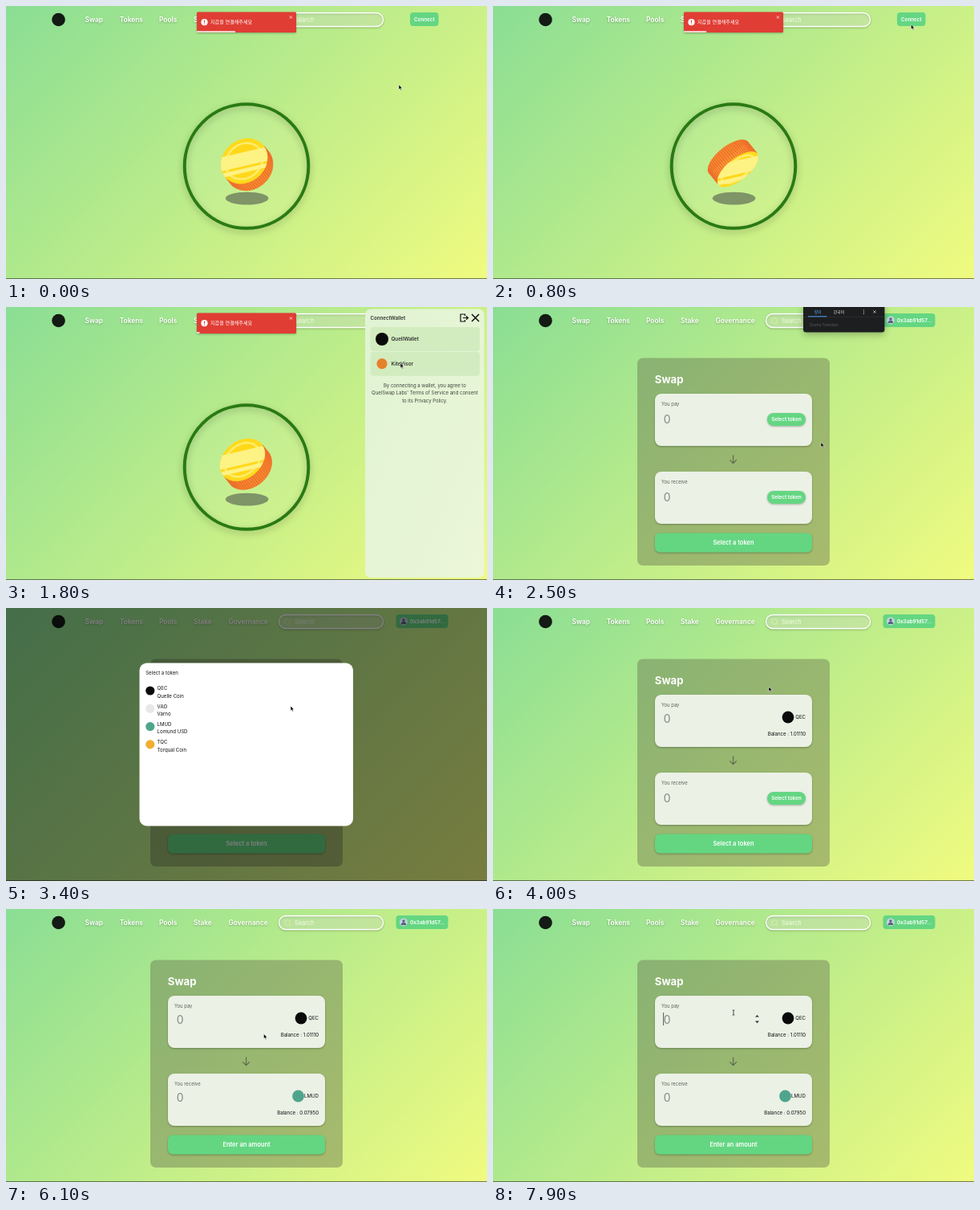
Animation of 600 by 340 pixels, one loop 8000 ms. Source, as an HTML page:

```html
<!DOCTYPE html>
<html lang="en">
<head>
<meta charset="utf-8">
<title>Token swap demo</title>
<style>
  html, body { margin: 0; width: 100%; height: 100%; overflow: hidden; }
  body { background: linear-gradient(135deg, #8ade94, #f0fb80); }
  svg { position: absolute; left: 0; top: 0; display: block; }
  text { font-family: Inter, "Noto Sans CJK KR", "Noto Sans CJK", sans-serif; white-space: pre; }
  .low { filter: drop-shadow(0 1px 1px rgba(0, 0, 0, .28)); }
  .deep { filter: drop-shadow(0 3px 4px rgba(0, 0, 0, .25)); }
</style>
</head>
<body>
<svg id="stage" width="600" height="340" viewBox="0 0 600 340"></svg>
<script>
const LOOP = 8000, STEP = 100;
const GREEN = '#64d682', INK = '#111';

// Markup helpers
const text = (x, y, size, str, { w = 400, fill = '#fff', at = 'start' } = {}) =>
  `<text x="${x}" y="${y}" font-size="${size}" font-weight="${w}" fill="${fill}" text-anchor="${at}">${str}</text>`;
const rect = (x, y, w, h, r, fill, more = '') =>
  `<rect x="${x}" y="${y}" width="${w}" height="${h}" rx="${r}" fill="${fill}" ${more}/>`;
const dot = (x, y, r, fill, more = '') =>
  `<circle cx="${x}" cy="${y}" r="${r}" fill="${fill}" ${more}/>`;
const line = (d, stroke, w, more = '') =>
  `<path d="${d}" fill="none" stroke="${stroke}" stroke-width="${w}" ${more}/>`;
const group = (id, body, more = '') => `<g id="${id}" ${more}>${body}</g>`;
const cross = (x, y, r, stroke, w) =>
  line(`M${x - r} ${y - r}l${2 * r} ${2 * r}m0 ${-2 * r}l${-2 * r} ${2 * r}`, stroke, w);

const tokens = [
  ['QEC', 'Quelle Coin', '#0a0a0a'],
  ['VAO', 'Varno', '#e8e8e8'],
  ['LMUD', 'Lomund USD', '#4fa58c'],
  ['TQC', 'Torqual Coin', '#f1ae2f'],
];

function nav() {
  const links = [[98.5, 'Swap'], [141.7, 'Tokens'], [191, 'Pools'], [234, 'Stake'], [277.5, 'Governance']];
  return dot(65.5, 17, 8.3, '#141a14') +
    `<g class="low">${links.map(([x, s]) => text(x, 20, 8.4, s, { w: 600 })).join('')}</g>` +
    rect(340.5, 8.5, 130, 17, 8.5, 'rgba(255,255,255,.22)', 'stroke="#fff" stroke-width="1.4" class="low"') +
    line('M353.6 19.6l2 2M354.3 17a3.3 3.3 0 1 1-6.6 0a3.3 3.3 0 1 1 6.6 0', 'rgba(235,240,170,.9)', .8) +
    text(360, 19.6, 7.4, 'Search', { fill: '#f4fbe6' }) +
    group('connect', rect(504, 8, 35.5, 17, 4, GREEN) + text(521.8, 19, 6.25, 'Connect', { w: 600, at: 'middle' })) +
    group('account', rect(486.5, 8, 65, 17, 4, GREEN) + dot(496, 16.5, 5, '#c3d2e2') +
      dot(496, 15, 1.7, '#56637a') + `<path d="M492.8 20a3.2 3.2 0 0 1 6.4 0z" fill="#56637a"/>` +
      text(504, 19, 6.4, '0x3ab91d57...', { w: 600 }));
}

function home() {
  const coin = group('coin',
    `<clipPath id="faceClip"><ellipse id="clipEdge" ry="31"/></clipPath>` +
    `<ellipse id="back" ry="31" fill="#f58a30"/><rect id="rim" y="-31" height="62" fill="#fb9c38"/>` +
    line('', '#ee6f2a', 1.3, 'id="ridges"') +
    group('face', `<ellipse id="disc" ry="31" fill="#ffda1c"/>
      <ellipse id="ring" ry="24.5" fill="#ffd81a" stroke="#ffec6c" stroke-width="2.6"/>
      <g clip-path="url(#faceClip)"><g transform="rotate(-64)" fill="#fdf284">
      <rect x="-34" y="-11" width="68" height="17"/><rect x="-34" y="9" width="68" height="5"/></g></g>`));
  return dot(300, 199.5, 77.5, 'rgba(255,255,255,.06)') +
    `<circle cx="300" cy="199.5" r="77.3" fill="none" stroke="#2a7a14" stroke-width="4" class="deep"/>` +
    `<ellipse cx="300.6" cy="239.6" rx="26.8" ry="7.9" fill="#7f9467"/>` + coin;
}

const picker = (id, y) => group(id,
  rect(342, y, 48, 16, 8, GREEN, 'class="low"') +
  text(366, y + 10.2, 6.3, 'Select token', { w: 600, at: 'middle' }) +
  text(212.8, y + 13, 14, '0', { fill: '#858b85' }));

const picked = (id, y, [name, , color], cx, balance) => group(id,
  dot(cx, y, 7.4, color) +
  text(390, y + 2.4, 6.1, name, { fill: INK, at: 'end' }) +
  text(390, y + 23.4, 6.1, 'Balance : ' + balance, { fill: INK, at: 'end' }) +
  text(212.8, y + 6.6, 14, '0', { fill: '#858b85' }));

function swap() {
  const box = (y, label) => rect(202, y, 196, 65, 8, '#ebf1e5', 'class="low"') +
    text(210, y + 15.2, 5.9, label, { fill: '#5c625a' });
  return rect(180, 63.5, 240, 258.5, 7, 'rgba(105,115,80,.45)') +
    text(201.8, 94.6, 13.2, 'Swap', { w: 700 }) +
    box(108, 'You pay') + box(205, 'You receive') +
    line('M299.6 184.5v10M295.3 190.4l4.3 4.3l4.3-4.3', '#5d6650', 1.1) +
    rect(202, 281.5, 196, 24, 6, GREEN, 'class="low"') +
    group('askToken', text(300, 296.3, 7.5, 'Select a token', { w: 600, at: 'middle' })) +
    group('askAmount', text(300, 296.3, 7.5, 'Enter an amount', { w: 600, at: 'middle' })) +
    picker('pickPay', 132) + picker('pickGet', 229) +
    picked('payToken', 136, tokens[0], 368, '1.01110') +
    picked('getToken', 233, tokens[2], 364.5, '0.07950') +
    group('spinner', `<path d="M327 134.6h5l-2.5-2.6zM327 139.6h5l-2.5 2.6z" fill="#333"/>`) +
    group('caret', rect(212.3, 129, .8, 16, 0, '#333'));
}

function toast() {
  return rect(238, 7.5, 124, 25.5, 1.5, '#e03d34', 'class="low"') +
    dot(247.5, 20.2, 4.1, '#fff') + line('M247.5 17.6v3.1M247.5 21.7v1.1', '#e03d34', 1.1) +
    text(255, 22.3, 6.1, '지갑을 연결해주세요') + cross(355.4, 14, 1.6, '#fff', .7) +
    rect(238, 31, 48, 2, 0, 'rgba(255,255,255,.75)', 'id="bar"');
}

function panel() {
  const row = (y, name, color, r) => rect(454.5, y, 136.5, 30, 4, '#d2ecbf') +
    dot(469, y + 15, r, color) + text(480.5, y + 17.3, 6.25, name, { w: 600, fill: '#333' });
  const terms = ['By connecting a wallet, you agree to',
    "QuelSwap Labs' Terms of Service and consent", 'to its Privacy Policy.'];
  return `<linearGradient id="glass" x2="1" y2="1"><stop stop-color="#e0f3d3"/><stop offset="1" stop-color="#ebf7d8"/></linearGradient>` +
    rect(448, 2.5, 148.5, 334.5, 7, 'url(#glass)') +
    text(454.5, 15.8, 6.15, 'ConnectWallet', { w: 600, fill: '#333' }) +
    line('M572.5 11v-2h-5.5v9h5.5v-2M570 13.5h6.3M574 11.2l2.4 2.3l-2.4 2.3', INK, 1.2) +
    cross(585.5, 13.5, 4.5, INK, 1.5) +
    row(25, 'QuellWallet', '#0a0a0a', 8) + row(55.7, 'KiteVisor', '#e5812a', 6.6) +
    terms.map((s, i) => text(522.4, 99.5 + 9.5 * i, 6, s, { fill: '#3f443c', at: 'middle' })).join('');
}

function translator() {
  return rect(387, -6, 101.5, 37.5, 3.5, '#1d1e20', 'class="deep"') +
    line('M387 12.4h101.5', '#34363a', .6) + line('M393 11.8h23.5', '#4a9df0', 1) +
    text(405, 8, 4.9, '영어', { fill: '#5aa9f5', at: 'middle' }) +
    text(431.5, 8, 4.9, '한국어', { fill: '#ddd', at: 'middle' }) +
    [3.8, 6, 8.2].map(y => dot(462.5, y, .6, '#ddd')).join('') + cross(476, 6, 1.7, '#ddd', .7) +
    text(395, 24.4, 4.6, 'Dostra Translate', { fill: '#5a5c60' });
}

function modal() {
  return rect(166.5, 68.5, 266.5, 203, 9, '#fff') +
    text(174.2, 83.2, 6.1, 'Select a token', { fill: INK }) +
    tokens.map(([name, full, color], i) => {
      const y = 103 + 22.3 * i;
      return dot(179.8, y, 5.6, color) + text(188.6, y - .8, 6.1, name, { fill: INK }) +
        text(188.6, y + 8.8, 6.1, full, { fill: INK });
    }).join('');
}

document.getElementById('stage').innerHTML =
  nav() + group('home', home()) + group('swap', swap()) +
  group('panel', panel()) + group('toast', toast()) + group('translator', translator()) +
  rect(0, 339, 600, 1, 0, 'rgba(30,40,30,.6)') +
  group('shade', rect(0, 0, 600, 340, 0, 'rgba(0,0,0,.5)')) + group('modal', modal()) +
  group('arrow', `<path d="M0 0v6l1.4-1.2l1 2.2l1-.4l-1-2.2h1.9z" fill="#000" stroke="#fff" stroke-width=".5"/>`) +
  group('beam', line('M-1.3-3.2q1.3 0 1.3 .8v4.8q0 .8-1.3 .8M1.3-3.2q-1.3 0-1.3 .8M0 2.4q0 .8 1.3 .8', '#222', .8));

const el = {};
document.querySelectorAll('[id]').forEach(n => el[n.id] = n);
const set = (id, attrs) => { for (const k in attrs) el[id].setAttribute(k, attrs[k]); };
const show = (id, on) => { el[id].style.display = on ? '' : 'none'; };
const clamp = v => Math.min(1, Math.max(0, v));
const ramp = (t, from, to) => clamp((t - from) / (to - from));
const smooth = p => p * p * (3 - 2 * p);

// Pointer path: time, x, y
const path = [
  [0, 490, 98], [300, 490, 98], [900, 524, 17], [1300, 535, 17], [1750, 492, 70], [1900, 492, 70],
  [2200, 112, 18], [2300, 112, 18], [2500, 409, 168.5], [2900, 366, 141], [3100, 366, 141],
  [3700, 344, 103], [4000, 344, 98], [4450, 366, 238], [4600, 366, 238], [4900, 357, 242.5],
  [5500, 325, 150], [5700, 325, 150], [6100, 321.5, 155.5], [7000, 300, 129], [8000, 300, 129],
];
function pointer(t) {
  const i = path.findIndex(k => k[0] > t);
  const [a, x0, y0] = path[i - 1], [b, x1, y1] = path[i];
  const p = smooth(ramp(t, a, b));
  return [x0 + (x1 - x0) * p, y0 + (y1 - y0) * p];
}

function drawCoin(t) {
  const R = 31, a = .55 + t * .00184, c = Math.cos(a), s = Math.sin(a);
  const rx = Math.max(.4, R * Math.abs(c));
  const front = -Math.sign(c) * 10.5 * s, back = -front, side = Math.sign(back - front);
  set('coin', { transform: `translate(${299.8 + .8 * c} ${196.5 + 1.1 * c}) rotate(51)` });
  set('back', { cx: back, rx });
  set('rim', { x: Math.min(front, back), width: Math.abs(front - back) });
  set('face', { transform: `translate(${front} 0)` });
  set('disc', { rx });
  set('clipEdge', { rx });
  set('ring', { rx: rx * .79 });
  let d = '';
  for (let f = -1.5; f <= 1.5; f += .1) {
    const x = side * rx * Math.cos(f);
    d += `M${front + x} ${R * Math.sin(f)}H${back + x}`;
  }
  set('ridges', { d });
}

function draw(t) {
  const onSwap = t >= 2300, linked = t >= 2000, payDone = t >= 3800, getDone = t >= 5700;
  show('home', !onSwap);
  show('swap', onSwap);
  if (!onSwap) drawCoin(t);
  show('connect', !linked);
  show('account', linked);

  const out = ramp(t, 1950, 2300);
  show('toast', out < 1);
  set('toast', { transform: `translate(0 ${-40 * out * out})`, opacity: 1 - out });
  set('bar', { width: Math.max(0, 48 - t * .0247) });

  const slide = 1 - (1 - ramp(t, 900, 1200)) ** 3 - ramp(t, 1900, 2100) ** 2;
  show('panel', slide > 0);
  set('panel', { transform: `translate(${154 * (1 - slide)} 0)` });
  show('translator', t >= 2200 && t < 2900);

  const dim = ramp(t, 3000, 3200) - ramp(t, 3700, 3900) + ramp(t, 4500, 4700) - ramp(t, 5600, 5800);
  for (const id of ['shade', 'modal']) {
    show(id, dim > 0);
    set(id, { opacity: dim });
  }
  show('pickPay', !payDone);
  show('payToken', payDone);
  show('pickGet', !getDone);
  show('getToken', getDone);
  show('askToken', !getDone);
  show('askAmount', getDone);

  const [x, y] = pointer(t);
  const inField = t > 6100 && y < 147;
  show('arrow', !inField);
  show('beam', inField);
  show('spinner', inField);
  show('caret', t >= 7300 && (t - 7300) % 1000 < 700);
  set(inField ? 'beam' : 'arrow', { transform: `translate(${x} ${y})` });
}

const start = performance.now();
function tick() {
  const t = (performance.now() - start) % LOOP;
  draw(Math.floor(t / STEP) * STEP);
  requestAnimationFrame(tick);
}
tick();
</script>
</body>
</html>
```
